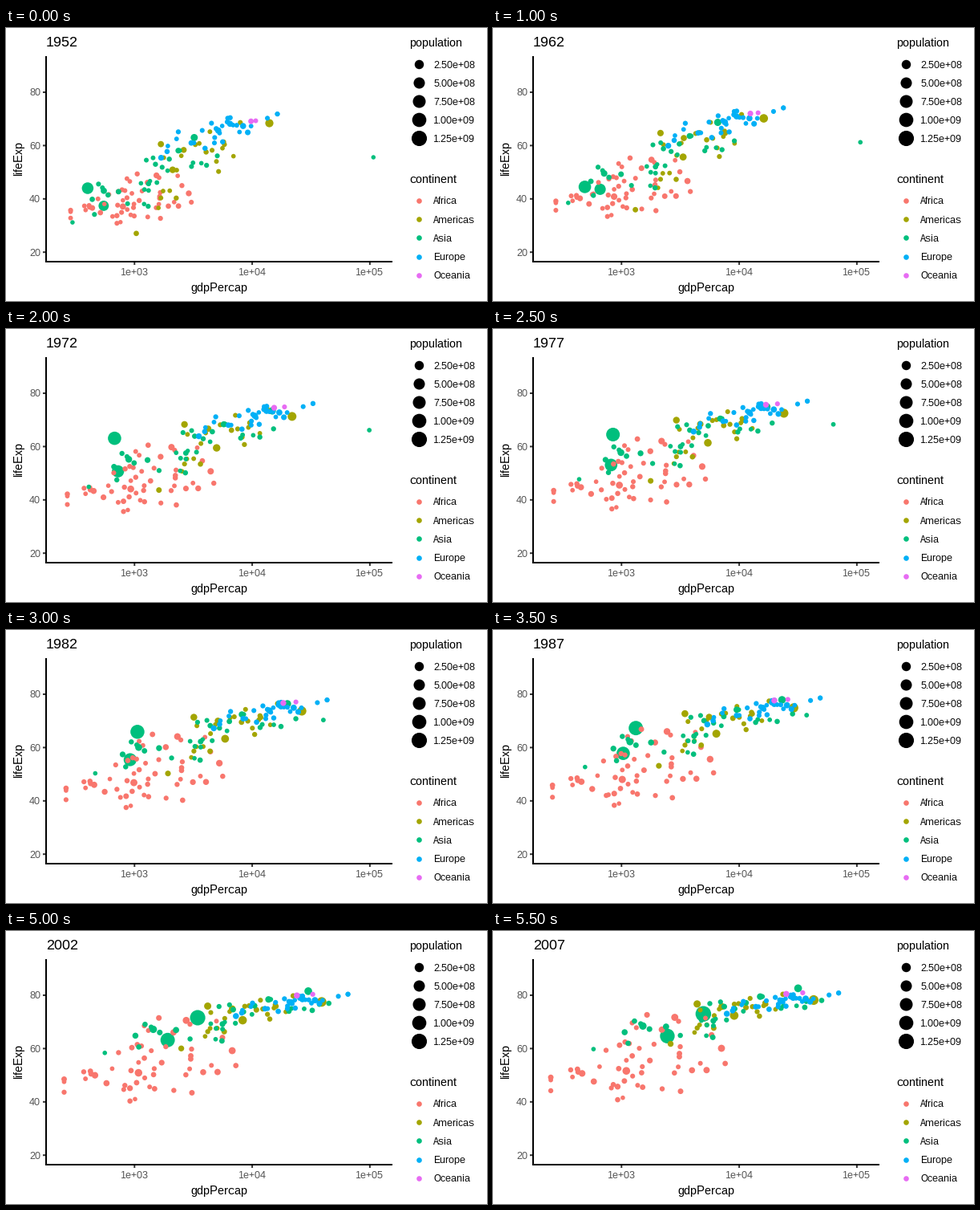
Recreate the animation shown at these times as a matplotlib script. Size 600 by 340 pixels, loop 6000 ms.

```python
import numpy as np
import matplotlib.pyplot as plt
from matplotlib.animation import FuncAnimation

plt.rcParams["font.family"] = "Liberation Sans"
plt.rcParams["text.hinting"] = "default"
plt.rcParams["text.hinting_factor"] = 1  # whole-pixel glyph advances

W, H, DPI = 600, 340, 100
PT = 72 / DPI  # points per pixel
SMALL, MEDIUM, LARGE = 11.73, 14.67, 17.6
MAX_POP = 1319  # millions
COLORS = {"Africa": "#F8766D", "Americas": "#A3A500", "Asia": "#00BF7D",
          "Europe": "#00B0F6", "Oceania": "#E76BF3"}

YEARS = np.arange(1952, 2008, 5)
t = np.linspace(0, 1, len(YEARS))
ease = t * (1.5 - 0.5 * t)  # progress slows down over the decades
rng = np.random.default_rng(7)


def between(ends, progress=ease):
    start, end = ends
    return start + (end - start) * progress


def px_x(log_gdp):
    return 160.3 + 146.8 * (log_gdp - 3)


def px_y(life):
    return 345.6 - 3.32 * life


def dot_area(radius):
    return (2 * radius * PT) ** 2


def pop_radius(pop):
    return 2.65 + 7.1 * np.sqrt(np.minimum(pop / MAX_POP, 1))


def normals(n):
    z = rng.normal(size=n)
    return np.clip((z - z.mean()) / z.std(), -1.9, 1.9)


countries = []  # (colour, x, y, area), the last three with one value per year


def add(continent, log_gdp, life, pop):
    countries.append((COLORS[continent], px_x(log_gdp), px_y(life),
                      dot_area(pop_radius(pop))))


def add_giant(continent, pops, gdp, life):
    """A large country, led through a few key years."""
    keys = (1952, 1962, 1972, 1992, 2007)
    add(continent, np.interp(YEARS, keys, np.log10(gdp)),
        np.interp(YEARS, keys, life), between(pops, t))


def add_cloud(continent, n, growth, gdp, gdp_sd, life, life_sd, tie, skew):
    """Random countries whose common centre and spread drift with time."""
    pops = 10 ** np.clip(rng.normal(0.7, 0.55, n), -1, 1.6)
    for a, b, pop in zip(normals(n), normals(n), pops):
        z = tie * a + np.sqrt(1 - tie ** 2) * b
        z -= skew * (z ** 2 - 1)
        add(continent, between(gdp) + between(gdp_sd) * a,
            between(life) + between(life_sd) * z,
            between((pop, pop * growth), t))


add_giant("Asia", (556, 1319), (400, 488, 677, 1656, 4959), (44, 44.5, 63.1, 68.7, 73))
add_giant("Asia", (372, 1110), (547, 658, 724, 1164, 2452), (37.4, 43.6, 50.7, 60.2, 64.7))
add_giant("Asia", (86, 127), (3217, 6577, 14779, 26825, 31656), (63, 68.7, 73.4, 79.4, 82.6))
add_giant("Americas", (158, 301), (13990, 16173, 21806, 32004, 42952), (68.4, 70.2, 71.3, 76.1, 78.2))
add_giant("Americas", (57, 190), (2109, 3337, 4986, 6950, 9066), (50.9, 55.7, 59.5, 67.1, 72.4))

# An oil state whose income collapses around 1977
collapse = 1 / (1 + np.exp((1977 - YEARS) / 2))
add("Asia", 5.03 - 0.46 * collapse, between((55.6, 77.6)), between((0.2, 2.5)))

# A country whose life expectancy plunges around 1992
plunge = np.exp(-((YEARS - 1992) / 3.5) ** 2)
add("Africa", between((2.69, 2.93)), between((40, 46.5)) - 22 * plunge,
    between((2.5, 9)))

add_cloud("Africa", 51, 3.0, (2.97, 3.14), (0.27, 0.39), (39.1, 55), (5, 8.6), 0.4, -0.1)
add_cloud("Americas", 23, 2.3, (3.49, 3.93), (0.25, 0.27), (53.3, 73.5), (8.5, 3.8), 0.6, 0.1)
add_cloud("Asia", 30, 2.6, (3.10, 3.75), (0.33, 0.52), (46.5, 71), (8.2, 6), 0.8, 0.15)
add_cloud("Europe", 30, 1.3, (3.72, 4.37), (0.26, 0.25), (64.8, 77.5), (5.7, 2.7), 0.85, 0.2)
add_cloud("Oceania", 2, 2.0, (4.01, 4.47), (0.02, 0.07), (69.2, 80.7), (0.2, 0.5), 0.9, 0)


fig = plt.figure(figsize=(W / DPI, H / DPI), dpi=DPI, facecolor="white")
ax = fig.add_axes([0, 0, 1, 1])
ax.set(xlim=(0, W), ylim=(H, 0))
ax.axis("off")


def label(x, y, text, size, color="black", **kw):
    return ax.text(x, y, text, fontsize=size * PT, color=color,
                   va="baseline", **kw)


def line(xs, ys, color="black"):
    ax.plot(xs, ys, color=color, lw=2 * PT, snap=False,
            solid_capstyle="butt")


def dot(x, y, radius, color):
    ax.scatter([x], [y], s=dot_area(radius), c=color, linewidths=0)


for life in (20, 40, 60, 80):
    line([46, 50], [px_y(life)] * 2, "#333333")
    label(43, px_y(life) + 4.3, str(life), SMALL, "#4D4D4D", ha="right")
for power in (3, 4, 5):
    line([px_x(power)] * 2, [291, 295], "#333333")
    label(px_x(power), 308, f"1e+0{power}", SMALL, "#4D4D4D", ha="center")
line([50, 50], [35, 292])
line([49, 482], [291, 291])
label(265.5, 328, "gdpPercap", MEDIUM, ha="center")
label(20, 163, "lifeExp", MEDIUM, ha="center", rotation=90,
      rotation_mode="anchor")

label(503, 23, "population", MEDIUM)
for i in range(5):
    pop = 250 * (i + 1)
    y = 44.7 + 23.04 * i
    dot(515, y, pop_radius(pop), "black")
    label(533, y + 5, f"{pop * 1e6:.2e}", SMALL)

label(503, 193, "continent", MEDIUM)
for i, (continent, color) in enumerate(COLORS.items()):
    y = 214.8 + 23.3 * i
    dot(515, y, 3.3, color)
    label(533, y + 4.5, continent, SMALL)

colors, xs, ys, areas = zip(*countries)
xs, ys, areas = map(np.array, (xs, ys, areas))
dots = ax.scatter(xs[:, 0], ys[:, 0], s=areas[:, 0], c=colors, linewidths=0)
title = label(50, 23, "", LARGE)


def update(i):
    title.set_text(str(YEARS[i]))
    dots.set_offsets(np.column_stack([xs[:, i], ys[:, i]]))
    dots.set_sizes(areas[:, i])
    return title, dots


anim = FuncAnimation(fig, update, frames=len(YEARS), interval=500, repeat=True)
plt.show()
```
